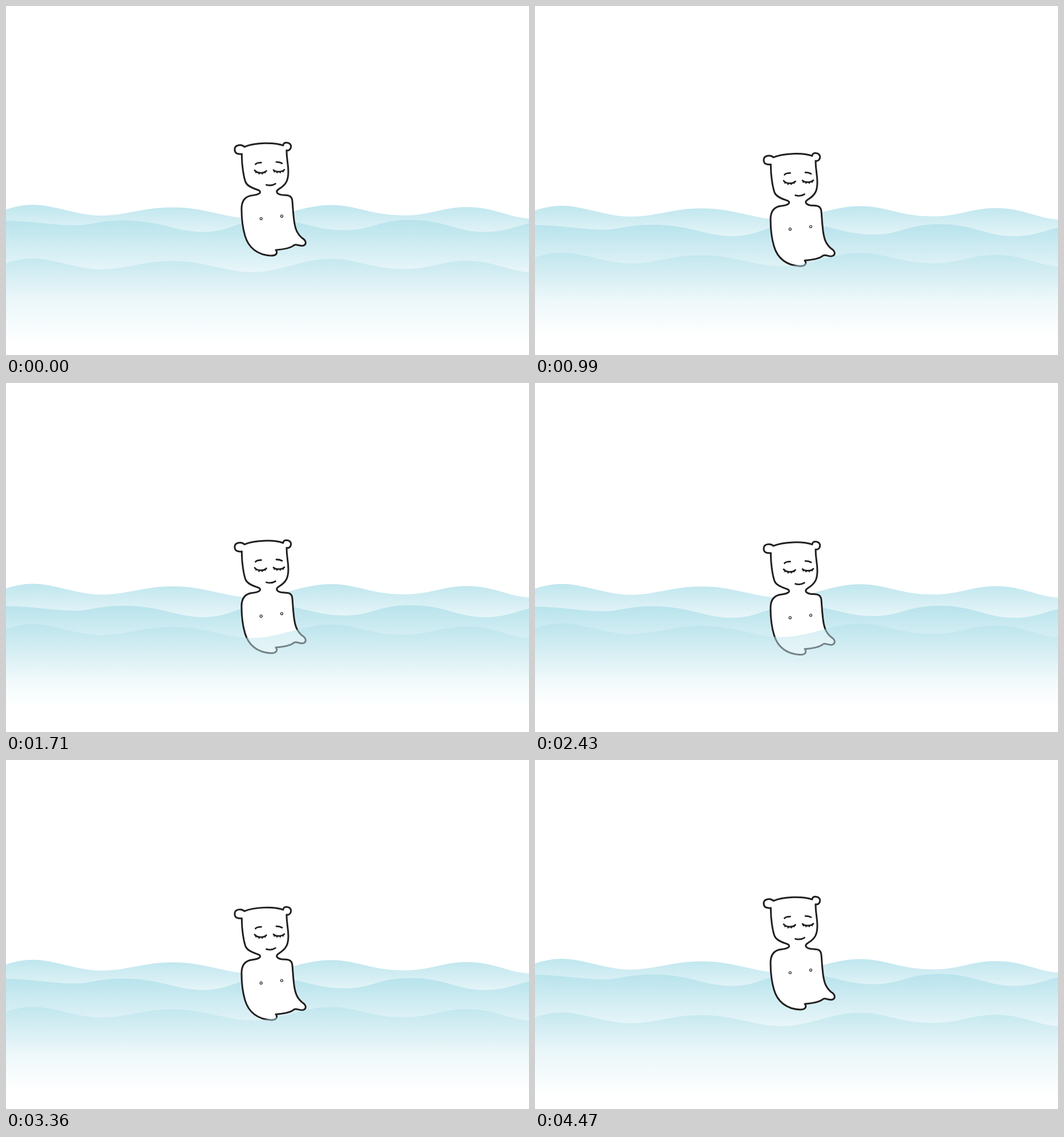
These frames come from a looping animation (917x611 px, 4.5 s). An HTML page:

```html
<!DOCTYPE html>
<html lang="en">
<head>
<meta charset="utf-8">
<title>Bathing bear</title>
<style>
  html, body { margin: 0; width: 100%; height: 100%; overflow: hidden; background: #fff; }
  svg { display: block; width: 917px; height: 611px; }
</style>
</head>
<body>
<svg viewBox="0 0 917 611">
  <defs>
    <linearGradient id="backFill" gradientUnits="userSpaceOnUse" x1="0" x2="0" y1="348" y2="440">
      <stop stop-color="#bfe6ee"/><stop offset="1" stop-color="#fff"/>
    </linearGradient>
    <linearGradient id="middleFill" gradientUnits="userSpaceOnUse" x1="0" x2="0" y1="374" y2="510">
      <stop stop-color="#b8e3ec"/><stop offset="1" stop-color="#fff"/>
    </linearGradient>
    <linearGradient id="frontFill" gradientUnits="userSpaceOnUse" x1="0" x2="0" y1="348" y2="496">
      <stop stop-color="#b0dfe9"/><stop offset="1" stop-color="#fff"/>
    </linearGradient>
    <path id="swell" d="M0 356.5C15 351 32 348 47 348C85 348 125 367 167 367C210 367 240 352.5 292 352.5
      C350 352.5 385 372 432 372C480 372 520 348.5 570 348.5C615 348.5 640 366.5 697 366.5
      C745 366.5 765 352 808 352C855 352 880 370 917 372V700H0Z"/>
  </defs>

  <use id="back" href="#swell" fill="url(#backFill)"/>
  <path id="middle" fill="url(#middleFill)" d="M0 376C40 376 85 384 120 384C150 384 160 375.5 207 375.5
    C270 375.5 300 395.5 345 395.5C395 395.5 410 373 455 373C515 373 540 392.5 592 392.5
    C645 392.5 650 374.5 710 374.5C770 374.5 790 395.5 840 395.5C875 395.5 895 385 917 380.5V700H0Z"/>

  <g id="bear" fill="none" stroke="#231f20" stroke-width="3" stroke-linecap="round" stroke-linejoin="round">
    <path fill="#fff" d="M418 246.5C414 242 401 242 401 251C401 259 408 259.5 413.5 259
      C413 278 417 300 420 308C424 318 440 320.5 444 323C448 326 445 330 432 331.5
      C418 333 413 342 413 355C413 375 416 392 419 402C425 423 441 436 465 437
      C474 437 477 432 473 427C485 426 497 424 503 420C508 414.5 514 421 521 419.5
      C528 417 526 410 519 406C510 398 507 390 505 375C502 350 503 345 501.5 338
      C499 330 492 331.5 483 330.5C474 329 472 324 479 320C492 312 495 304 495 290
      C495 275 492 270 492 252.5C497 254 500.5 249 499.5 244C497 238 486 237 486 244C470 238 435 239 418 246.5Z"/>
    <path stroke-width="2.8" d="M437.5 277C439 275 443 274 447.5 274M474 273Q480 273 484 275.3
      M436 287.5C440 293 452 293.5 456.5 288.5M469 287C473 291 484 291 488 286.5
      M456.5 313C462 314.5 468 314 472.5 311"/>
    <path stroke-width="2.4" d="M439 290.5l-.7 .9M444 292l-.4 1.7M449 292l.4 1.6M453.5 290.5l.9 1
      M471 289l-.6 1M475.5 290l-.4 1.5M480.5 290l.4 1.5M485 289l.9 1"/>
    <g stroke-width="1.2">
      <circle cx="447.3" cy="372.2" r="2"/>
      <circle cx="483.5" cy="367.8" r="2"/>
    </g>
  </g>

  <use id="front" href="#swell" fill="url(#frontFill)" opacity=".5"/>
</svg>
<script>
  const PERIOD = 4500, LOWEST = 2170;
  // Resting offset and vertical travel of each layer
  const layers = { back: [0, 4], middle: [0, 16], bear: [0, 40], front: [94, -22] };

  function draw(now) {
    const sink = (1 + Math.cos((now - LOWEST) / PERIOD * 2 * Math.PI)) / 2;
    for (const [id, [rest, travel]] of Object.entries(layers))
      document.getElementById(id).setAttribute("transform", `translate(0 ${rest + travel * sink})`);
  }

  let start;
  function tick(now) {
    start ??= now;
    draw((now - start) % PERIOD);
    requestAnimationFrame(tick);
  }
  draw(0);
  requestAnimationFrame(tick);
</script>
</body>
</html>
```
